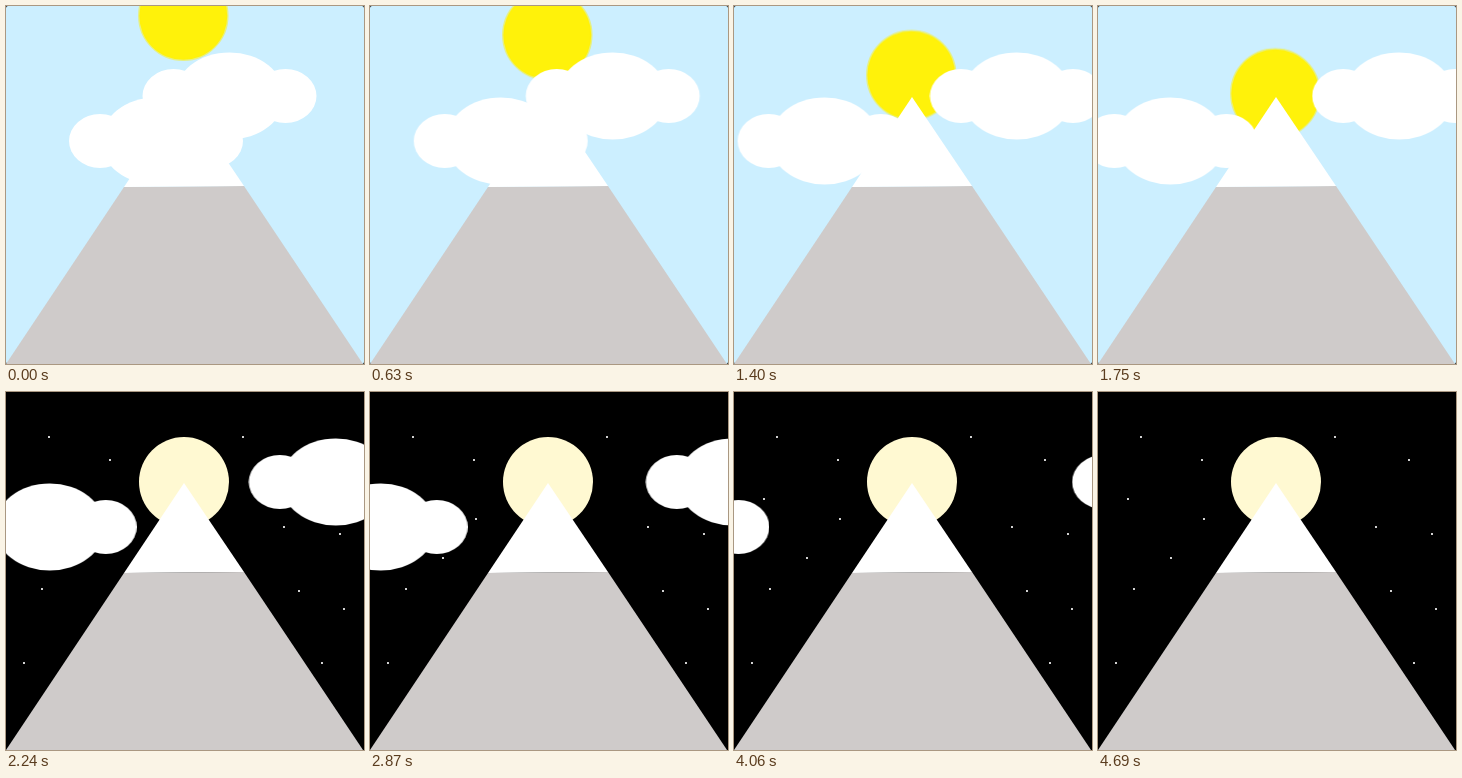
An HTML page without scripts that plays this animation: 358 by 358 pixels, repeating every 4.9 s.

```html
<!DOCTYPE html>
<html lang="en">
<head>
<meta charset="utf-8">
<title>Mountain, day to night</title>
<style>
  html, body { margin: 0; height: 100%; overflow: hidden; background: #000; }
  svg { display: block; width: 100vw; height: 100vh; }

  .drift { animation: drift 4.9s infinite; }
  .sun { --dx: 0; --dy: 1; }
  .left { --dx: -1; --dy: 0; }
  .right { --dx: 1; --dy: 0; }
  .night { animation: nightfall 4.9s step-end infinite; }

  /* Distances travelled along each part's direction, advancing every 70 ms */
  @keyframes drift {
    0% { --d: 0; transform: none; animation-timing-function: step-end; }
    5.714% {
      transform: translate(calc(var(--dx) * 1px), calc(var(--dy) * 1px));
      animation-timing-function: steps(22);
    }
    37.141% {
      transform: translate(calc(var(--dx) * 81.3px), calc(var(--dy) * 81.3px));
      animation-timing-function: step-end;
    }
    37.142% {
      transform: translate(calc(var(--dx) * 84.3px), calc(var(--dy) * 84.3px));
      animation-timing-function: steps(41);
    }
    95.713% {
      transform: translate(calc(var(--dx) * 234.6px), calc(var(--dy) * 234.6px));
      animation-timing-function: step-end;
    }
    95.714%, 100% {
      transform: translate(calc(var(--dx) * 260px), calc(var(--dy) * 260px));
    }
  }
  @keyframes nightfall {
    0% { visibility: hidden; }
    37.142%, 100% { visibility: visible; }
  }
</style>
</head>
<body>
<svg viewBox="0 0 358 358">
  <defs>
    <g id="cloud" fill="#fff">
      <ellipse rx="55" ry="43.6"/>
      <ellipse cx="-56" rx="31" ry="27"/>
      <ellipse cx="56" rx="31" ry="27"/>
    </g>
  </defs>

  <rect width="358" height="358" rx="2" fill="#ccefff"/>
  <g class="drift sun">
    <circle cx="177.3" cy="9.8" r="44" fill="#fff20a" stroke="#fff20a" stroke-opacity=".5" stroke-width="2.5"/>
  </g>

  <g class="night">
    <rect width="358" height="358"/>
    <path fill="none" stroke="#fff" stroke-width="2.2" stroke-linecap="round"
      d="M43 45h0M104 68h0M237 45h0M311 68h0M30 107h0M106 127h0M278 135h0M334 142h0M73 166h0M36 197h0M293 199h0M338 217h0M18 271h0M316 271h0"/>
    <circle cx="178" cy="90" r="45" fill="#fff9d2"/>
  </g>

  <path fill="#cfcbca" d="M118 181 238 180 357 358H0Z"/>
  <path fill="#fff" d="M178 91 238 180 118 181Z"/>

  <g class="drift left"><use href="#cloud" x="150" y="135"/></g>
  <g class="drift right"><use href="#cloud" x="223.5" y="90"/></g>
</svg>
</body>
</html>
```
